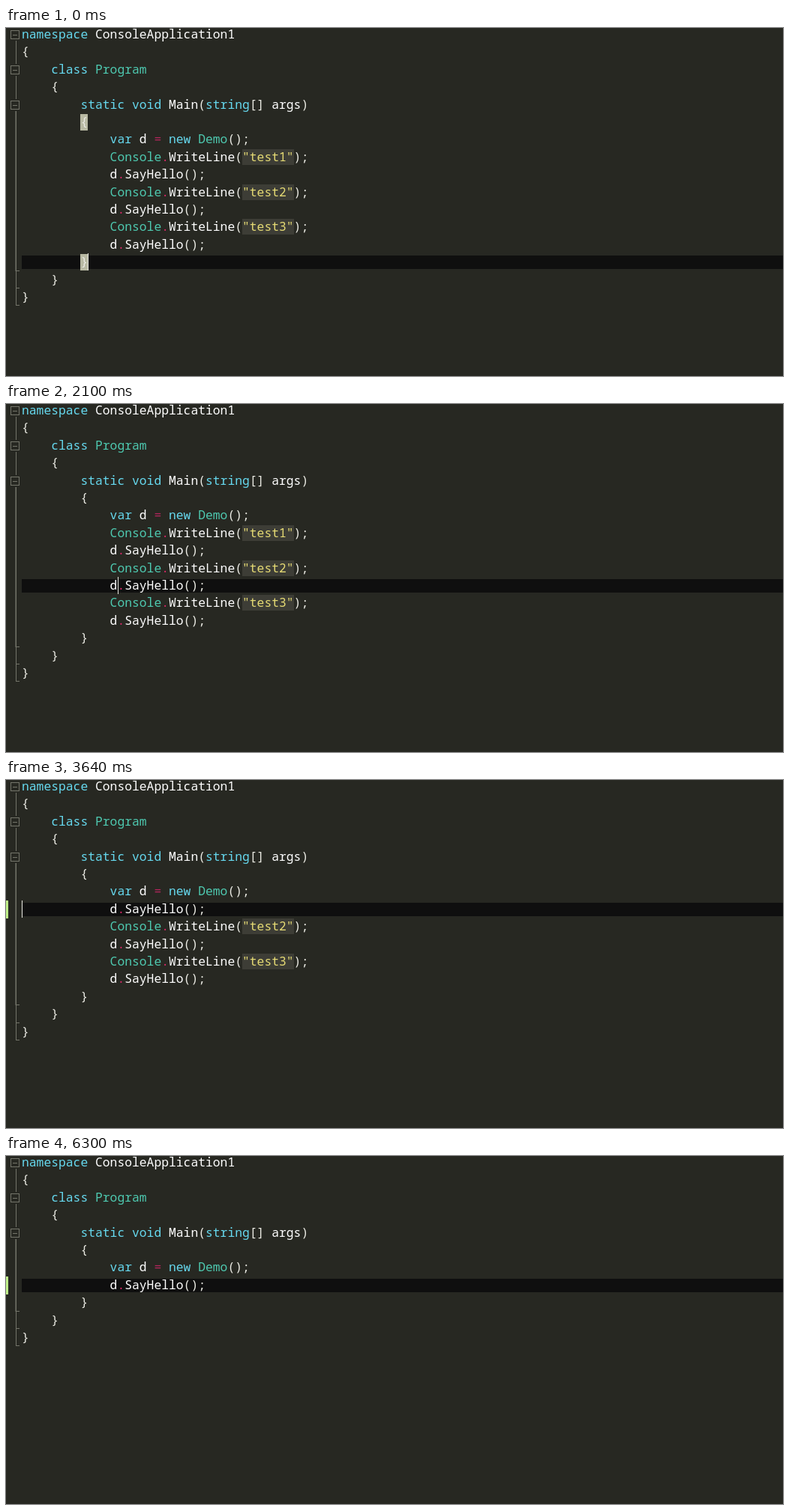
These frames come from a looping animation (1036x465 px, 6510 ms). An HTML page with a canvas:

```html
<!DOCTYPE html>
<html lang="en">
<head>
<meta charset="utf-8">
<title>Code editor</title>
<style>
html, body { margin: 0; width: 100%; height: 100%; overflow: hidden; background: #272822; }
canvas { display: block; }
</style>
</head>
<body>
<canvas id="stage" width="1036" height="465"></canvas>
<script>
const ctx = document.getElementById('stage').getContext('2d');
const LOOP = 6510, LEFT = 21, CHAR = 9.8, ROW = 23.4, FIRST_CALL = 7;

const calls = [1, 2, 3].flatMap(n => [
  `            Console.WriteLine("test${n}");`,
  '            d.SayHello();'
]);
const head = [
  'namespace ConsoleApplication1',
  '{',
  '    class Program',
  '    {',
  '        static void Main(string[] args)',
  '        {',
  '            var d = new Demo();'
];
const tail = ['        }', '    }', '}'];

const rules = [
  [/^"/, '#e6db74'],
  [/^(namespace|class|static|void|string|var|new)$/, '#66d9ef'],
  [/^(Program|Demo|Console)$/, '#4ec9b0'],
  [/^=$/, '#b3265c'],
  [/^\.$/, '#e0286a'],
  [/^\w/, '#ffffff']
];
const PLAIN = '#ebebe4';

// Each step overrides part of the editor state from its time on.
const steps = [
  [0, { row: 13, col: 9, caret: true, braces: true, mark: '', cut: 0 }],
  [70, { caret: false }],
  [490, { row: 12, caret: true }],
  [560, { braces: false }],
  [630, { caret: false }],
  [770, { col: 12, caret: true }],
  [910, { col: 13 }],
  [1050, { caret: false }],
  [1190, { mark: 'd' }],
  [1540, { caret: true }],
  [1820, { row: 11, mark: '' }],
  [2030, { caret: false }],
  [2100, { row: 10, caret: true }],
  [2170, { row: 9 }],
  [2310, { row: 8 }],
  [2450, { caret: false }],
  [2590, { mark: 'd' }],
  [2660, { row: 7, caret: true, mark: '' }],
  [2940, { mark: 'Console', caret: false }],
  [3430, { caret: true }],
  [3640, { col: 0, mark: '', cut: 1 }],
  [3990, { cut: 2 }],
  [4270, { cut: 3 }],
  [4410, { caret: false }],
  [4550, { cut: 4, caret: true }],
  [4830, { cut: 5 }],
  [5320, { caret: false }],
  [5810, { caret: true }],
  [6300, { caret: false }]
];

const rowTop = row => Math.round(ROW * row - 3);
const colX = col => LEFT + CHAR * col;

function rect(x, y, w, h, color) {
  ctx.fillStyle = color;
  ctx.fillRect(x, y, w, h);
}

function tokens(line) {
  return [...line.matchAll(/"[^"]*"|\w+|[^\s\w]/g)].map(m => {
    const rule = rules.find(r => r[0].test(m[0]));
    return { text: m[0], col: m.index, color: rule ? rule[1] : PLAIN };
  });
}

function drawMark(token, row) {
  const x = Math.round(colX(token.col));
  const y = rowTop(row);
  const w = Math.round(token.text.length * CHAR);
  if (token.text === 'd' && row === 6) {
    rect(x - 1, y + 1, w + 1, 23, '#71983f');
    rect(x, y + 2, w - 1, 21, '#48721c');
  } else {
    rect(x, y + 1, w, 22, '#45463f');
  }
}

function drawLine(line, row, state) {
  const y = rowTop(row);
  for (const t of tokens(line)) {
    const x = colX(t.col);
    if (t.text[0] === '"') {
      rect(Math.round(x), y + 1, Math.round(t.text.length * CHAR), 21, '#3d3d36');
    }
    if (t.text === state.mark) drawMark(t, row);
    if (state.braces && (row === 5 || row === 13)) {
      rect(99, y + 1, 10, 22, '#b8b9a3');
    }
    ctx.fillStyle = t.color;
    // Anchor every character to the column grid.
    [...t.text].forEach((ch, i) => ctx.fillText(ch, x + i * CHAR, y + 17));
  }
}

function drawMargin(count) {
  const color = '#74756a';
  for (const row of [0, 2, 4]) {
    const mid = rowTop(row) + 12;
    ctx.strokeStyle = color;
    ctx.lineWidth = 1;
    ctx.strokeRect(6.5, mid - 5.5, 11, 11);
    rect(9, mid, 6, 1, color);
    if (row < 4) rect(13, mid + 8, 1, 31, color);
  }
  const bottom = rowTop(count);
  const inner = rowTop(count - 2);
  rect(12.5, 111, 1.5, inner - 111, color);
  rect(13, inner, 1, bottom - inner, color);
  for (let i = 0; i < 3; i++) rect(13, rowTop(count - i) - 1, 5, 1, color);
}

function draw(time) {
  const state = {};
  for (const [at, change] of steps) {
    if (at <= time) Object.assign(state, change);
  }
  const lines = [...head, ...calls.slice(state.cut), ...tail];
  const y = rowTop(state.row);

  rect(0, 0, 1036, 465, '#272822');
  rect(LEFT, y + 3, 1036 - LEFT, 18, '#0f0f0f');
  if (state.cut) rect(0, rowTop(FIRST_CALL), 3, 24, '#bdec88');
  drawMargin(lines.length);

  ctx.font = '16.33px "Noto Sans Mono", "DejaVu Sans Mono", monospace';
  ctx.textBaseline = 'alphabetic';
  lines.forEach((line, row) => drawLine(line, row, state));

  if (state.caret) rect(Math.round(colX(state.col) + 0.1), y, 1, 23, '#e8e8e2');
}

const start = performance.now();
function tick() {
  draw((performance.now() - start) % LOOP);
  requestAnimationFrame(tick);
}
tick();
</script>
</body>
</html>
```
